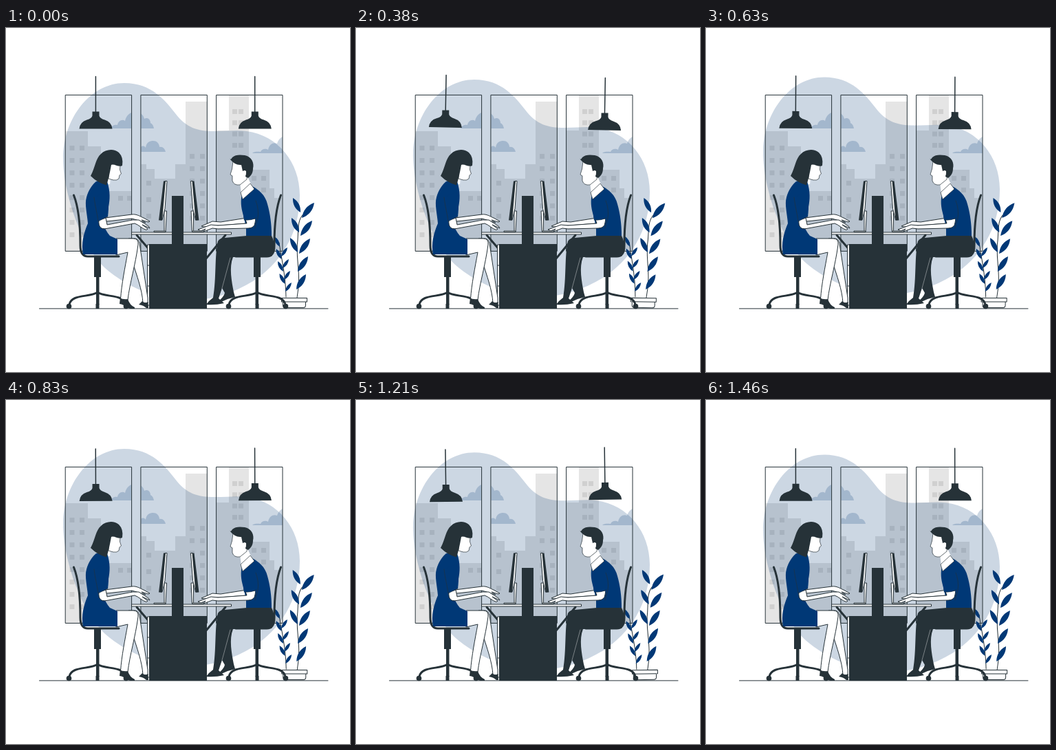
An HTML page for the animation above (1.5 s loop, 500x500 px).

```html
<!DOCTYPE html>
<html lang="en">
<head>
<meta charset="utf-8">
<title>Office desk</title>
<style>
  html, body { margin: 0; width: 100%; height: 100%; overflow: hidden; background: #fff; }
  svg { display: block; width: 100%; height: 100%; }
  .ink { fill: #263238; }
  .navy { fill: #003876; }
  .line { fill: none; stroke: #263238; stroke-linecap: round; stroke-linejoin: round; }
  .skin { fill: #fff; stroke: #263238; stroke-linejoin: round; }
</style>
</head>
<body>
<svg viewBox="0 0 500 500">
  <defs>
    <clipPath id="panes"><path class="frames"/></clipPath>
    <g id="lamp">
      <path class="line" stroke-width="1.5" d="M130.400 70.500V123"/>
      <path class="ink" d="M125.500 121.500h10v6q1 4 8 6q10 3 11 13h-48q1-10 11-13q7-2 8-6z"/>
    </g>
    <g id="chair">
      <path class="line" stroke-width="3" d="M98.500 243C106 262 108 285 108 316Q108 332 119 332H164"/>
      <path class="ink" d="M128 333h10v29h-10zM131 362h4.500v40h-4.500z"/>
      <path class="line" stroke-width="3" d="M133 384C123 392 95 386 92 402M133 384C143 392 171 386 174 402"/>
      <circle class="ink" cx="91.500" cy="404.500" r="3.800"/>
      <circle class="ink" cx="174.500" cy="404.500" r="3.800"/>
      <path class="ink" d="M130.500 401h5v7h-5z"/>
    </g>
    <g id="monitor">
      <path class="skin" d="M230 266h3.500l-1.500 30h-2z"/>
      <path class="skin" d="M215 295h17v1.500h-17z"/>
      <path class="skin" d="M231 222.500h3l-3 40l-4 16.500h-3z"/>
      <path class="ink" d="M229 222.500h3l-5 57h-5z"/>
    </g>
  </defs>

  <g clip-path="url(#panes)">
    <g fill="#e5e5e5">
      <path d="M86 150h33v22h19v65h45v90H86z"/>
      <path d="M196 198h8v7h12v14h30v-21h15V107h32v220h-97z"/>
      <path d="M305 149h19V97h29v109h30v27h7v14h13v80h-98z"/>
    </g>
    <path id="squares" fill="#d0d0d0"/>
    <g class="navy" opacity=".2">
      <path d="M152 146C154 141 159 140 162 141C163 135 169 132 173 135C175 126 181 122 188 122C196 122 200 127 201 132C206 129 210 133 210 138Q214 140 215 146z"/>
      <path d="M196 180v-7C199 170 202 172 203 174C204 166 209 164 214 164C220 164 223 169 223 173C228 172 231 176 232 180z"/>
      <path d="M358 182C361 179 367 180 370 180C372 175 378 175 381 177C383 168 389 166 394 168Q396 161 402 158V182z"/>
    </g>
  </g>

  <path id="blob" class="navy" opacity=".2" d="M83 190C83 132 122 80 172 80C212 80 232 106 246 124C262 145 278 150 303 150C322 150 335 148 350 150C395 156 427 195 427 243C427 300 398 343 359 368C331 385 300 395 270 396C230 397 185 382 150 354C110 322 83 240 83 190z"/>

  <path class="line frames"/>
  <g id="lamps"><use href="#lamp"/><use href="#lamp" x="231.300"/></g>
  <path class="line" d="M48.500 407.900H468"/>

  <g id="plant">
    <path class="line" d="M423 392C430 355 420 335 424 308C425 292 424 280 431 272M407 391C407 360 401 340 397 312"/>
    <path id="leaves" class="navy"/>
    <path class="skin" d="M402.500 398h33v5q0 3.500-3.500 3.500h-26q-3.500 0-3.500-3.500zM400.500 392.500h37v5.500h-37z"/>
  </g>

  <use href="#chair"/>
  <use href="#chair" transform="translate(498) scale(-1 1)"/>

  <!-- desk -->
  <path class="line" stroke-width="3" stroke-linecap="butt" d="M190 301L209 323M319 301L291 335"/>
  <path class="skin" d="M205.500 315h4v88h-4zM205.500 345h4M205.500 375h4"/>

  <!-- woman -->
  <path class="skin" d="M178 306H188Q193 307 194 313L206 392V400H199C198 380 190 360 184 340z"/>
  <path class="ink" d="M198 397q4 4 8.500 1l.5 9h-3q-4-4-11-5z"/>
  <path class="skin" d="M160 306H185Q193 306 192 315C188 345 180 370 177 395L166.500 394C168 372 173 348 177 326L160 330z"/>
  <path class="ink" d="M166 392q5 5 11 2q3 9 10 12v2h-6c-6-1-8-6-16-7z"/>
  <path class="skin" d="M144 276L183 271C190 270 195 274 200 276L209 281L207 282L197 279L203 283L190 279L183 277L146 281z"/>
  <path fill="#fff" d="M143 212v15h8l1-10z"/>
  <path class="navy" d="M131 223Q140 220 147 223C152 238 151 250 149 260L147 272L141 283Q144 294 151 302L162 307V329H112C109 313 113 298 119 284C118 270 114 256 117 246C120 235 126 227 131 223z"/>
  <path class="skin" d="M135 279C134 289 138 293 146 291.500L187 284C193 286 198 292 204 293.500L206 292L198 286L209 291L207 288L193 279L184 279L147 286L145 276z"/>
  <path class="navy" d="M128 246C130 262 133 272 134 281L148 274C150 260 149 246 146 238z"/>
  <path class="line" stroke-width=".6" d="M128 246C130 262 133 272 134 281L148 274"/>
  <path class="skin" stroke-width=".7" d="M150 198L166 197L165.500 206L167.500 212L165 214L164 219Q161 222 156 221L149 219z"/>
  <path class="ink" d="M123 215C130 202 130 190 138 183C145 176 157 175 164 181Q171 188 169 200C163 203 158 197 153 199C151 210 149 220 146 228.500Q133 225 123 215z"/>

  <!-- man -->
  <path class="ink" d="M386 302Q394 318 386 332L330 333C324 348 328 368 331 384L333 391Q323 393 313 398L309 397Q317 390 318 385L314 378L309 393L317 400Q304 403 291 402Q295 396 301 392C306 365 303 330 308 310Q311 305 318 305L350 302z"/>
  <path class="line" style="stroke:#fff" stroke-width=".4" d="M326 334C321 352 318 364 314 378"/>
  <path class="skin" d="M350 276L312 282L300 281L284 288L288 289L302 287L310 287L351 284z"/>
  <path class="navy" d="M356 229C368 235 377 243 380 256C384 270 386 285 386 302H349V290L345 272C341 260 341 250 343 241z"/>
  <path class="skin" d="M348 278L350 284L308 287L298 286L279 293L283 295L290 292L287 296L300 291L308 292L352 291Q361 291 362 283L363 277z"/>
  <path class="navy" d="M346 245C343 257 344 268 346 279Q355 280 362 277L368 291L369 268L364 248z"/>
  <path class="line" stroke-width=".6" d="M363 251Q368 264 366 276L362 291M346 279Q356 280 364 276"/>
  <path fill="#fff" d="M340 224L342 241L357 229L350 214z"/>
  <path class="skin" stroke-width=".7" d="M341 239L355 226L361 234L344 249z"/>
  <path class="skin" stroke-width=".7" d="M330 194L328.500 205L326 213L329 215L329 222Q331 229 340 228L350 220L351 204L344 195z"/>
  <path class="ink" d="M325 190Q327 192 329 188C333 184 340 184 347 185C357 187 361 196 359 204C359 211 356 215 352 218L348 216L349 208L344 208L342 199Q333 200 325 190z"/>
  <path fill="#fff" d="M344 208q5-3 5 2q0 6-4 6z"/>

  <path class="skin" d="M182.500 297h145v3h-145z"/>
  <use href="#monitor"/>
  <use href="#monitor" transform="translate(502.500) scale(-1 1)"/>
  <path class="ink" d="M241 244h17v70h34v94h-84v-94h33z"/>
</svg>

<script>
const $ = id => document.getElementById(id);
const repeat = (count, make) => Array.from({ length: count }, (_, i) => make(i)).join('');

// Three equal window frames
const frames = repeat(3, i => `M${86.600 + 109.700 * i} 97.400h96v227h-96z`);
document.querySelectorAll('.frames').forEach(path => path.setAttribute('d', frames));

// Lit squares on the buildings, in regular grids
const grid = (x, y, cols, rows, stepX, stepY = 18) =>
  repeat(cols, c => repeat(rows, r => `M${x + c * stepX} ${y + r * stepY}h7v7h-7z`));
$('squares').setAttribute('d',
  grid(92.500, 171, 2, 8, 14.500) + grid(163, 244, 2, 1, 13) + grid(204, 222, 1, 3, 0, 24) +
  grid(267, 183, 2, 6, 15) + grid(329, 118, 2, 4, 9, 16.300) + grid(357, 215, 2, 2, 14, 17));

// A pointed leaf from its base along (dx, dy)
const leaf = (x, y, dx, dy, bulge = .3) =>
  `M${x} ${y}q${dx / 2 + dy * bulge} ${dy / 2 - dx * bulge} ${dx} ${dy}` +
  `q${-dx / 2 - dy * bulge} ${-dy / 2 + dx * bulge} ${-dx} ${-dy}z`;
$('leaves').setAttribute('d',
  repeat(5, i => leaf(430 - 2 * i, 276 + 26 * i, 18 - i, -22)) +
  repeat(3, i => leaf(428 - 2 * i, 268 + 29 * i, -11, -21)) +
  repeat(4, i => leaf(398 + 2.500 * i, 318 + 18 * i, -8, -15) + leaf(400 + 2 * i, 332 + 17 * i, 9, -13)));

const LOOP = 1500;
const triangle = p => 1 - Math.abs(1 - 2 * p);

function draw(now) {
  const p = now % LOOP / LOOP;
  const sway = 2 * triangle((p + .25) % 1) - 1;
  $('blob').setAttribute('transform', `translate(0 ${-10 * triangle(p)})`);
  $('lamps').setAttribute('transform', `rotate(${sway} 246 108.700)`);
  $('plant').setAttribute('transform', `rotate(${sway} 418 327)`);
  requestAnimationFrame(draw);
}
draw(performance.now());
</script>
</body>
</html>
```
